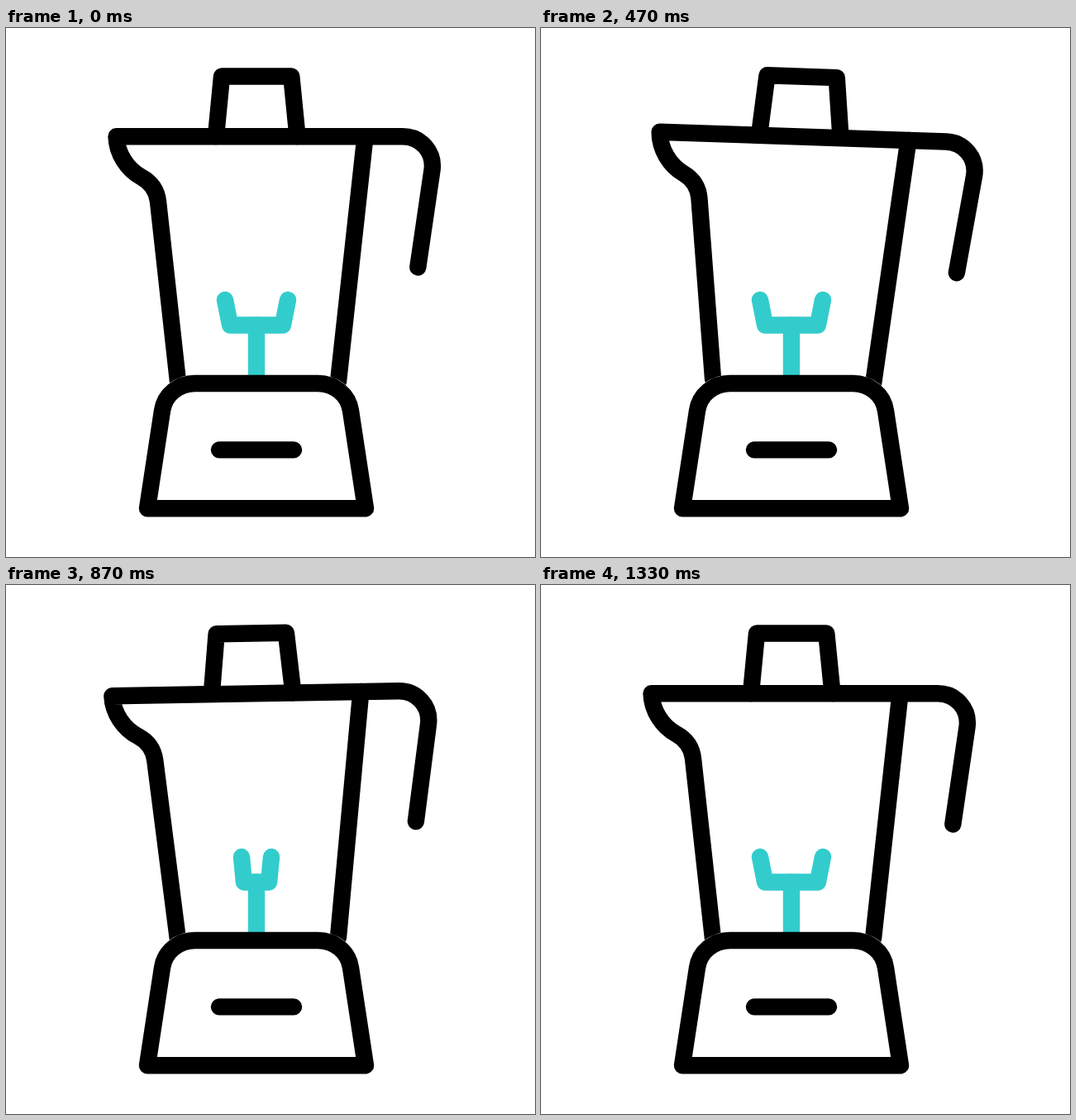
Write an HTML page that moves like this. It is 640 by 640 pixels and loops after 1670 ms.

```html
<!DOCTYPE html>
<html lang="en">
<head>
<meta charset="utf-8">
<title>Blender</title>
<style>
  html, body { margin: 0; width: 100%; height: 100%; overflow: hidden; background: #fff; }
  svg { display: block; width: 100%; height: 100%; }
  path { fill: none; stroke: #000; stroke-width: 20.4; stroke-linecap: round; stroke-linejoin: round; }
  .teal path, path.teal { stroke: #33cccc; }
  path.seam { stroke: #fff; stroke-width: 20.9; }
</style>
</head>
<body>
<svg viewBox="0 0 640 640">
  <g id="jug">
    <path d="M208 428L184 210C182.5 197 176 187 164 180.500C147 171.500 134 152 133.500 131.300H480C502 131.300 518.500 150 515.500 172L498.300 289.500"/>
    <path d="M434.500 131.300L402 428M254 131L261 58.500H345.300L352.500 131"/>
  </g>
  <path class="seam" d="M189 463C192 443.500 209 430 228.500 430H377.500C397 430 414 443.500 417 463"/>
  <g class="teal">
    <path id="blade"/>
    <path d="M303 359.500V422"/>
  </g>
  <path d="M171 581.300L189 463C192 443.500 209 430 228.500 430H377.500C397 430 414 443.500 417 463L435 581.300ZM258 510.400H348"/>
  <path id="swirl" class="teal" d="M159 237C159 269 217 290.500 303 290.500S447 269 447 237"/>
</svg>
<script>
const LOOP = 1670, STEP = 100 / 3, LAST = 40;
const PIVOT = '303 428';
const [jug, blade, swirl] = ['jug', 'blade', 'swirl'].map(id => document.getElementById(id));
const swirlLength = swirl.getTotalLength();

// [step, degrees] and [phase, half width]
const sway = [[0, 0], [11, 0], [15, 2.27], [19, -2.88], [23, 2.88], [27, -1.66], [30, 1.5], [33.5, -1.9], [37, 0], [50, 0]];
const spin = [[0, 38], [.25, 39.6], [.385, 39], [.615, 27], [.77, 24], [.846, 18], [1, 38]];

const clamp = x => Math.min(1, Math.max(0, x));
const ease = x => (1 - Math.cos(Math.PI * clamp(x))) / 2;

function sample(keys, x) {
  const i = Math.max(1, keys.findIndex(k => k[0] >= x));
  const [x0, y0] = keys[i - 1], [x1, y1] = keys[i];
  return y0 + (y1 - y0) * ease((x - x0) / (x1 - x0));
}

function draw(ms) {
  const step = Math.floor((ms % LOOP + 5) / STEP);
  const run = Math.min(Math.max(step, 1), LAST) - 1;

  jug.setAttribute('transform', `rotate(${sample(sway, step)} ${PIVOT})`);

  const tip = sample(spin, run / 6.5 % 1), foot = tip * .84;
  blade.setAttribute('d', `M${303 - tip} 329L${303 - foot} 359.500H${303 + foot}L${303 + tip} 329`);

  const phase = run % 14;
  const head = ease(phase / 4), tail = ease((phase - 2.08) / 6.92);
  const visible = run < LAST - 1 && head - tail > .001;
  swirl.style.visibility = visible ? 'visible' : 'hidden';
  swirl.style.strokeDasharray = `${(head - tail) * swirlLength} ${swirlLength * 2}`;
  swirl.style.strokeDashoffset = -tail * swirlLength;
}

const start = performance.now();
function tick() {
  draw(performance.now() - start);
  requestAnimationFrame(tick);
}
tick();
</script>
</body>
</html>
```
